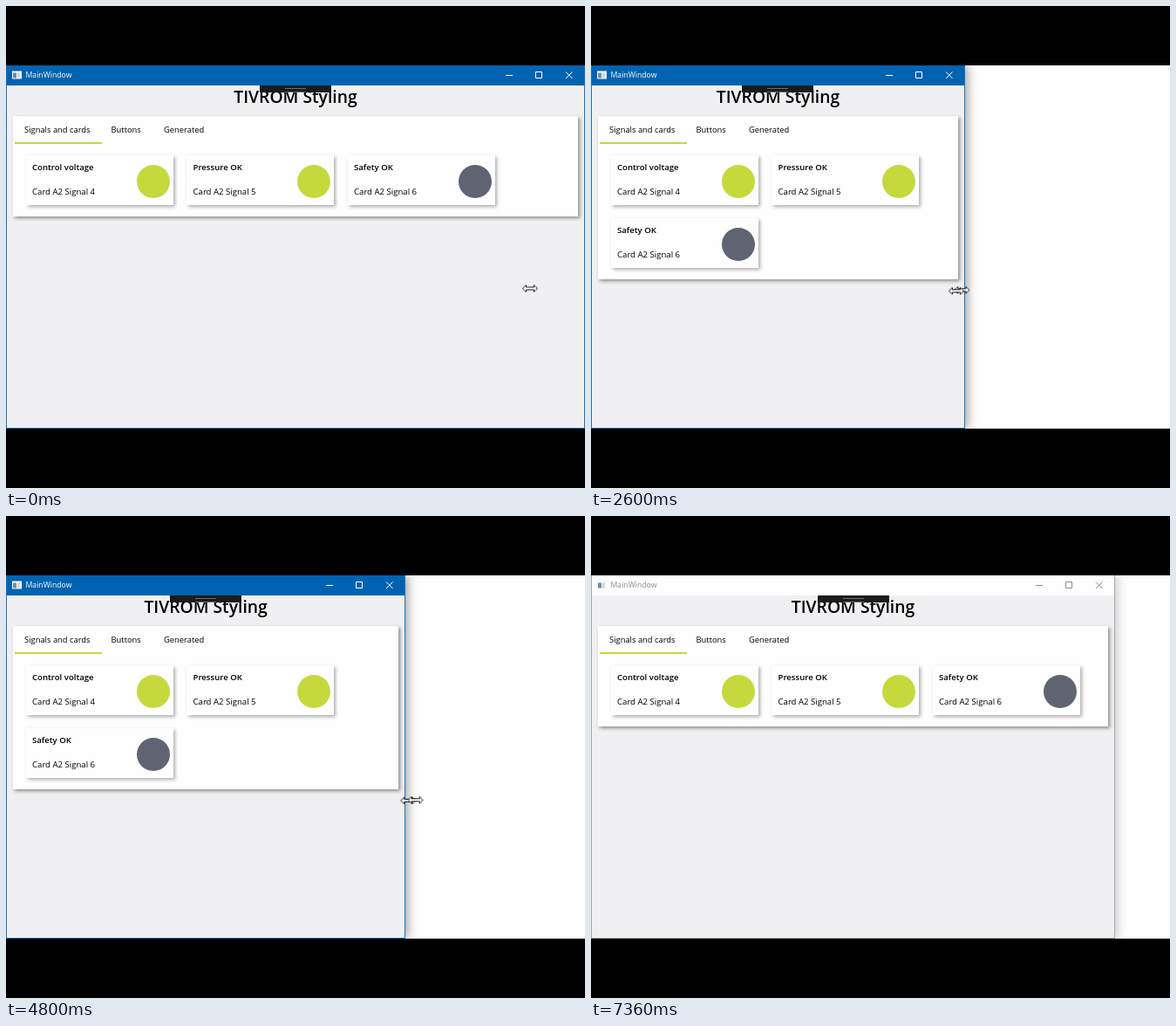
Write an HTML page that moves like this. It is 664 px wide and 552 px high and loops after 7430 ms.

```html
<!DOCTYPE html>
<html lang="en">
<head>
<meta charset="utf-8">
<title>Responsive cards</title>
<style>
  :root { --loop: 7430ms; --green: #c5d93d; --slate: #5f6372; }
  * { box-sizing: border-box; }
  html, body { margin: 0; width: 100%; height: 100%; overflow: hidden; background: #000; }
  body { position: relative; font-family: "Open Sans", "Noto Sans", sans-serif; color: #000; }

  .screen { position: absolute; left: 0; top: 68px; width: 664px; height: 416px; overflow: hidden; background: #fefefe; }
  .window {
    --bar: #0063b1; --ink: #fff; --edge: #1a73bd; --shade: rgba(0, 0, 0, .36);
    position: absolute; left: 0; top: 0; width: 664px; height: 416px;
    background: #f0f0f2; box-shadow: 3px 0 11px var(--shade);
    animation: resize var(--loop) linear infinite, blur var(--loop) step-end infinite;
  }
  .window::after {
    content: ""; position: absolute; inset: 0;
    border: 1px solid var(--edge); border-top: 0;
  }
  .bar { position: absolute; inset: 0 0 auto; height: 23px; background: var(--bar); color: var(--ink); }
  .bar span { position: absolute; left: 22.5px; top: 0; font-size: 8.7px; line-height: 23px; }
  .icon { position: absolute; left: 7px; top: 6px; }
  .controls { position: absolute; right: 0; top: 0; fill: none; stroke: currentColor; }

  h1 {
    position: absolute; inset: 24px 0 auto; margin: 0;
    font-size: 19.3px; font-weight: 600; line-height: 24px; text-align: center; white-space: nowrap;
  }
  .grip { position: absolute; left: 50%; top: 23px; width: 82px; height: 8px; margin-left: -41px; background: #1b1b1c; }
  .grip::before {
    content: ""; position: absolute; left: 29px; top: 3px; width: 24px; height: 3px;
    border: solid #6c6c6e; border-width: 1px 0;
  }

  .panel {
    position: absolute; left: 8px; right: 8px; top: 58px; padding: 44.5px 14.5px 13px;
    background: #fefefe; box-shadow: 2px 2px 4px rgba(0, 0, 0, .42);
  }
  .tab { position: absolute; top: 6px; font-size: 9.4px; font-weight: 500; line-height: 20px; white-space: nowrap; }
  .line { position: absolute; left: 2px; top: 30px; width: 100px; height: 2px; background: var(--green); }

  .cards { display: flex; flex-wrap: wrap; gap: 14.5px 15.5px; }
  .card {
    position: relative; flex: none; width: 169px; height: 57.5px;
    background: #fefefe; box-shadow: 2px 2px 4px rgba(0, 0, 0, .32);
    font-size: 9.6px; font-weight: 500; line-height: 20px; white-space: nowrap;
  }
  .card b, .card span { position: absolute; left: 7.5px; top: 4.3px; font-weight: 600; }
  .card span { top: 32.3px; font-weight: 500; }
  .card i {
    position: absolute; left: 127.2px; top: 11.8px; width: 38px; height: 38px;
    border-radius: 50%; background: var(--green);
  }
  .card i.off { background: var(--slate); }

  .pointers { position: absolute; left: 0; top: 0; fill: #fff; stroke: #000; stroke-width: .9; }
  .sizer { animation: drag var(--loop) linear infinite; }
  .trail { animation-delay: -7350ms; }
  .sizers { animation: sizers var(--loop) step-end infinite; }
  .arrow { visibility: hidden; animation: leave var(--loop) linear infinite, arrow var(--loop) step-end infinite; }

  @keyframes resize {
    0%, 13.459% { width: 664px; }
    16.151% { width: 648px; }
    23.284% { width: 553px; }
    27.725% { width: 507px; }
    33.647% { width: 437px; }
    34.993% { width: 429px; }
    41.723% { width: 385px; }
    44.415% { width: 378px; }
    44.8%, 52.49% { width: 377px; }
    55.182% { width: 388px; }
    62.315% { width: 442px; }
    64.603% { width: 458px; }
    72.678% { width: 549px; }
    78.466% { width: 588px; }
    81.561%, 100% { width: 601px; }
  }
  @keyframes drag {
    0%, 5.38% { transform: translate(674px, 298px); }
    7.537%, 13.459% { transform: translate(663.5px, 298.5px); }
    16.151% { transform: translate(630px, 302px); }
    23.284% { transform: translate(528px, 312px); }
    27.725% { transform: translate(477.5px, 317.3px); }
    33.647% { transform: translate(427px, 325px); }
    34.993% { transform: translate(419px, 326.3px); }
    41.723% { transform: translate(383px, 332.5px); }
    44.415%, 52.49% { transform: translate(376px, 333.5px); }
    55.182% { transform: translate(394px, 331.5px); }
    62.315% { transform: translate(452px, 326.5px); }
    64.603% { transform: translate(469.5px, 325.3px); }
    72.678% { transform: translate(558px, 322.5px); }
    78.466% { transform: translate(597px, 322.3px); }
    81.561%, 100% { transform: translate(601px, 323.5px); }
  }
  @keyframes leave {
    0%, 84.253% { transform: translate(602px, 326px); }
    89.637%, 100% { transform: translate(628px, 490px); }
  }
  @keyframes sizers { 0% { visibility: visible; } 84.253%, 100% { visibility: hidden; } }
  @keyframes arrow { 0% { visibility: hidden; } 84.253%, 100% { visibility: visible; } }
  @keyframes blur {
    0% { --bar: #0063b1; --ink: #fff; --edge: #1a73bd; --shade: rgba(0, 0, 0, .36); }
    99.05%, 100% { --bar: #fefefe; --ink: #8c8c8c; --edge: #a6a6a8; --shade: rgba(0, 0, 0, .2); }
  }
</style>
</head>
<body>
<div class="screen">
  <div class="window">
    <h1>TIVROM Styling</h1>
    <div class="bar">
      <svg class="icon" width="11" height="10">
        <path d="M0 .5H11V9.5H0Z" fill="#f4f6f8"/>
        <path d="M1 2.5H5V8.5H1Z" fill="#6f8ea3"/>
        <path d="M6 2.5H8.5V8.5H6Z" fill="#c9d2d8"/>
      </svg>
      <span>MainWindow</span>
      <svg class="controls" width="100" height="23">
        <path d="M9 11.5H17M43.5 7.5H50.5V14.5H43.5ZM78 7.5L85.5 15M85.5 7.5L78 15"/>
      </svg>
    </div>
    <div class="grip"></div>
    <div class="panel">
      <span class="tab" style="left:13px">Signals and cards</span>
      <span class="tab" style="left:112.5px">Buttons</span>
      <span class="tab" style="left:173px">Generated</span>
      <div class="line"></div>
      <div class="cards">
        <div class="card"><b>Control voltage</b><span>Card A2 Signal 4</span><i></i></div>
        <div class="card"><b>Pressure OK</b><span>Card A2 Signal 5</span><i></i></div>
        <div class="card"><b>Safety OK</b><span>Card A2 Signal 6</span><i class="off"></i></div>
      </div>
    </div>
  </div>
  <svg class="pointers" width="664" height="416" viewBox="0 68 664 416">
    <defs>
      <path id="sizer" d="M-8.5 0L-4.5-4V-1.5H4.5V-4L8.5 0L4.5 4V1.5H-4.5V4Z"/>
    </defs>
    <g class="sizers">
      <g class="sizer trail"><use href="#sizer"/></g>
      <g class="sizer"><use href="#sizer"/></g>
    </g>
    <path class="arrow" d="M0 0V14L3.3 11L5.4 15.8L7.5 14.9L5.4 10.2H10Z"/>
  </svg>
</div>
</body>
</html>
```
